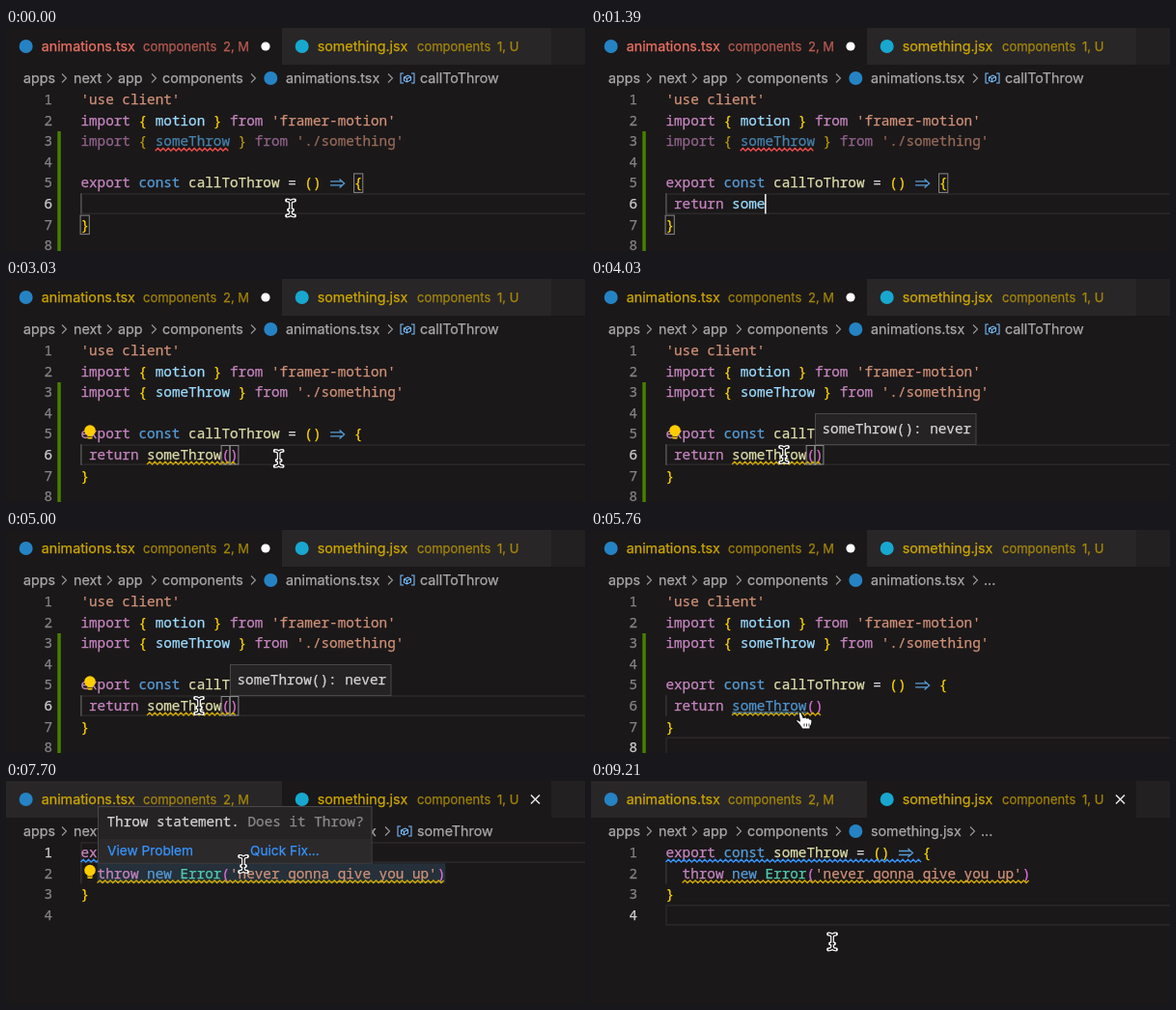
Animation of 600x231 px, one loop 9.24 s. Source, as an HTML page:

```html
<!DOCTYPE html>
<html lang="en">
<head>
<meta charset="utf-8">
<title>Editor demo</title>
<style>
  html, body { margin: 0; width: 100%; height: 100%; overflow: hidden; background: #1b1819; }
  svg { display: block; width: 600px; height: 231px; }
  text { white-space: pre; font: 14.3px Inter, sans-serif; stroke-width: .25px; }
  .small { font-size: 13px; }
  .action { font-size: 13.7px; }
  .code { font: 14.32px "Noto Sans Mono", "DejaVu Sans Mono", monospace; font-variant-ligatures: none; }
</style>
</head>
<body>
<svg id="stage" viewBox="0 0 600 231"></svg>
<script>
const LOOP = 9240, LEFT = 77.4, CELL = 8.59, ROW = 21.6;
const SAVED = 5350, OPENED = 6000, LAST_CLICK = 8500;
const stage = document.getElementById('stage');
const color = {
  keyword: '#c586c0', blue: '#569cd6', string: '#ce9178', gold: '#ffd700', name: '#9cdcfe',
  fn: '#dcdcaa', paren: '#da70d6', type: '#4ec9b0', plain: '#d4d4d4', link: '#4e94ce',
  constant: '#5ab4f0', error: '#f14c4c', warn: '#cca700', info: '#3794ff'
};

// Pointer stops: time, x, y
const path = [
  [0, 295, 186.5], [2900, 295, 186.5], [3480, 200, 182], [5000, 200, 182], [5300, 170, 222],
  [5400, 170, 222], [5700, 219, 196.5], [6100, 219, 196.5], [6800, 215, 97], [7100, 215, 97],
  [7550, 246, 86], [7850, 246, 86], [8400, 250, 166.5], [LOOP, 250, 166.5]
];

const between = (t, a, b) => t >= a && t < b;
const colX = col => LEFT + col * CELL;
const rowY = row => 74 + ROW * (row - 1);

// A hairline stroke gives the text its slightly heavier weight
const text = (x, y, str, fill, cls = '', extra = '') =>
  `<text x="${x}" y="${y}" fill="${fill}" stroke="${fill}" class="${cls}" ${extra}>${str}</text>`;
const rect = (x, y, w, h, fill, extra = '') =>
  `<rect x="${x}" y="${y}" width="${w}" height="${h}" fill="${fill}" ${extra}/>`;
const stroke = (d, ink, width = 1, extra = '') =>
  `<path d="${d}" fill="none" stroke="${ink}" stroke-width="${width}" ${extra}/>`;
const dot = (x, y, r, fill) => `<circle cx="${x}" cy="${y}" r="${r}" fill="${fill}"/>`;

function arrow(x, y) {
  return stroke(`M${x + 1} ${y - 2}h12.5M${x + 1} ${y + 2}h12.5M${x + 10.5} ${y - 4.5}l5 4.5l-5 4.5`, color.blue, 1.3);
}

// Tokens alternate colour name and text
function line(row, tokens, col = 0) {
  let out = '';
  for (let i = 0; i < tokens.length; i += 2) {
    const str = tokens[i + 1];
    out += str.startsWith('=>')
      ? arrow(colX(col), rowY(row) + .5)
      : text(colX(col), rowY(row) + 5, str, color[tokens[i]], 'code');
    col += str.length;
  }
  return out;
}

function squiggle(row, from, to, ink) {
  const end = colX(to);
  let x = colX(from), up = true, d = `M${x} ${rowY(row) + 10}`;
  for (; x + 2.7 <= end; up = !up) d += `L${x += 2.7} ${rowY(row) + (up ? 7.3 : 10)}`;
  return stroke(d, ink, 1.4);
}

const bracket = (row, col) =>
  rect(colX(col) - .3, rowY(row) - 9.5, CELL + .6, 19.5, 'none', 'stroke="#888"');
const guide = (row, ink) => rect(LEFT, rowY(row) - 10.8, 1, ROW, ink);
const caret = (row, col) => rect(colX(col) - .5, rowY(row) - 10, 1.6, 20.5, '#e8e8e8');
const chevron = x => stroke(`M${x - 2} 47.5l4.5 4.5l-4.5 4.5`, '#999', 1.1);

function gutter(count, current) {
  const y = rowY(current);
  let out = rect(LEFT + .6, y - 10, 530, ROW - 1.4, 'none', 'stroke="#2a2728" stroke-width="1.6"');
  for (let n = 1; n <= count; n++)
    out += text(48, rowY(n) + 5, n, n === current ? '#d0d0d0' : '#858585', 'code', 'text-anchor="end"');
  return out;
}

function tab(x, width, active, ink, file, badge) {
  const first = x === 0, descX = x + (first ? 142 : 140), badgeX = x + (first ? 225 : 223);
  return rect(x, 0, width, 38, active ? '#1b1819' : '#292627') +
    dot(x + 20.7, 19, 7, first ? '#2583c4' : '#18a8cf') + text(x + 36.7, 24, file, ink) +
    `<g opacity=".75">${text(descX, 24, 'components', ink, 'small')}${text(badgeX, 24, badge, ink, 'small')}</g>`;
}

function breadcrumb(file, chevX, symbol) {
  const grey = '#a9a9a9', iconX = chevX + 10;
  let out = [[18, 'apps'], [70, 'next'], [116, 'app'], [162, 'components'], [290, file]]
    .map(([x, str]) => text(x, 57, str, grey)).join('');
  out += [60, 107, 153, 256, chevX].map(chevron).join('') + dot(274.3, 52, 7, '#2583c4');
  if (!symbol) return out + text(chevX + 9, 57, '...', grey);
  const icon = `M${iconX + 4} 47h-3v10h3M${iconX + 12} 47h3v10h-3` +
    `M${iconX + 4.5} 51l4-2l3 1.5v3.5l-4 2l-3-1.5zl3 1.5l4-2m-4 2v3`;
  return out + stroke(icon, '#75beff', 1.1) + text(chevX + 31, 57, symbol, grey);
}

function bulb(y) {
  return dot(87, y - 1.5, 5.8, '#ffcc00') + rect(84.5, y + 2, 5, 5, '#ffcc00') +
    rect(84.5, y + 4.5, 5, 1, '#5a4a10');
}

function callerFile(t) {
  const typedAt = i => 500 + i * 80 + (i > 10 ? 150 : 0);
  const source = 'return someThrow(';
  let typed = 0;
  while (typed < source.length && t >= typedAt(typed)) typed++;
  const called = typed === source.length;
  const checked = t >= 2120, used = t >= 2400, clicked = t >= SAVED;
  const linked = between(t, 5650, OPENED);
  const word = source.slice(7, Math.min(typed, 16));
  const current = clicked ? 8 : 6;
  const badge = checked && !used ? '1, M' : '2, M';
  const width = badge === '1, M' ? 284 : 286; // the digit 1 is narrower

  let out = tab(0, width, true, checked ? color.warn : '#ea7163', 'animations.tsx', badge) +
    dot(width - 17, 19, 4.6, '#fff') +
    tab(width, 279, false, color.warn, 'something.jsx', '1, U') +
    breadcrumb('animations.tsx', 398, clicked ? '' : 'callToThrow') +
    gutter(8, current) + rect(53.3, 107, 3.5, 124, '#487e02') +
    line(1, ['string', "'use client'"]) +
    line(2, ['keyword', 'import ', 'gold', '{ ', 'name', 'motion ', 'gold', '} ', 'keyword', 'from ', 'string', "'framer-motion'"]);

  const imported = ['keyword', 'import ', 'gold', '{ ', checked ? 'name' : 'constant', 'someThrow ', 'gold', '} ',
    'keyword', 'from ', 'string', "'./something'"];
  out += `<g opacity="${used ? 1 : .68}">${line(3, imported)}</g>`;
  if (!checked) out += squiggle(3, 9, 18, color.error);

  out += line(5, ['keyword', 'export ', 'blue', 'const ', 'fn', 'callToThrow ', 'plain', '= ', 'gold', '() ', 'blue', '=> ', 'gold', '{']) +
    line(7, ['gold', '}']) + guide(6, clicked ? '#454243' : '#666') +
    line(6, ['keyword', source.slice(0, Math.min(typed, 6))], 1) +
    line(6, [linked ? 'link' : called ? 'fn' : 'name', word], 8);
  if (called) out += line(6, ['paren', '()'], 17);
  if (checked) out += squiggle(6, 8, 19, color.warn);
  if (linked) out += rect(colX(8), rowY(6) + 6.5, 9 * CELL, 1, color.link);

  if (t < 2260) out += bracket(5, 33) + bracket(7, 0);
  else if (!clicked) out += bracket(6, 17) + bracket(6, 18);
  if (between(t, 500, 2300) || between(t % 1000, 230, 730))
    out += clicked ? caret(8, 0) : caret(6, 1 + typed);
  if (between(t, 2650, SAVED)) out += bulb(158.5);
  if (between(t, 3700, 5060))
    out += rect(232.5, 139.5, 166.5, 32, '#252324', 'stroke="#4a4748"') +
      text(239.5, 160, 'someThrow(): never', color.plain, 'code');
  return out;
}

function problemCard() {
  return rect(95.5, 26.5, 283.5, 58.5, '#252324', 'stroke="#4a4748"') +
    rect(96, 60, 282.5, 24.5, '#2b292a') +
    text(104.5, 47, 'Throw statement.', color.plain, 'code') +
    text(104.5 + 17 * CELL, 47, 'Does it Throw?', '#8b8889', 'code') +
    text(105, 77, 'View Problem', color.info, 'action') + text(253, 77, 'Quick Fix...', color.info, 'action');
}

function throwerFile(t) {
  const card = between(t, 7050, 8100), clicked = t >= LAST_CLICK;
  let out = tab(0, 286, false, color.warn, 'animations.tsx', '2, M') +
    tab(286, 279, true, color.warn, 'something.jsx', '1, U') +
    stroke('M544 14.5l9 9m0-9l-9 9', '#e8e8e8', 1.5) +
    breadcrumb('something.jsx', 395, clicked ? '' : 'someThrow') +
    gutter(4, clicked ? 4 : 1) + guide(2, '#454243');
  if (card) out += rect(colX(2), rowY(2) - 10.3, 42 * CELL, 20.6, '#25303a');
  out += line(1, ['keyword', 'export ', 'blue', 'const ', 'fn', 'someThrow ', 'plain', '= ', 'gold', '() ', 'blue', '=> ', 'gold', '{']) +
    line(2, ['keyword', 'throw ', 'blue', 'new ', 'type', 'Error', 'paren', '(', 'string', "'never gonna give you up'", 'paren', ')'], 2) +
    line(3, ['gold', '}']) +
    squiggle(1, 0, 31, color.info) + squiggle(2, 2, 44, color.warn);
  if (between(t % 1000, 230, 730)) out += clicked ? caret(4, 0) : caret(1, 13);
  if (card) out += problemCard();
  if (between(t, 6700, LAST_CLICK)) out += bulb(94);
  return out;
}

function pointer(t) {
  if (between(t, 500, 2900)) return '';
  const i = path.findIndex(stop => stop[0] > t);
  const [t0, x0, y0] = path[i - 1], [t1, x1, y1] = path[i];
  const p = (t - t0) / (t1 - t0), k = p * p * (3 - 2 * p);
  const place = `transform="translate(${x0 + (x1 - x0) * k} ${y0 + (y1 - y0) * k})"`;
  if (between(t, 5650, 6100))
    return `<path ${place} d="M-4 -7q1.5-1.5 3 0l2 5q3-1.5 3.5.5q2.5-1 3 1q2.5-.5 2.5 2q0 4-2 6v2h-8q-3-5-6.5-8q0-2.5 4 0z"
      fill="#fff" stroke="#111" stroke-width="1.1" stroke-linejoin="round"/>` +
      stroke('M2 4v3M4.5 4v3M7 4v3', '#111', .8, place);
  const beam = 'M-4 -8q4 0 4 3v10q0 3-4 3M4 -8q-4 0-4 3v10q0 3 4 3M-2 2h4';
  return stroke(beam, '#fff', 3.8, place + ' stroke-linecap="round"') + stroke(beam, '#111', 1.4, place);
}

let shown = '';
function draw(now) {
  const t = now % LOOP;
  const view = rect(0, 0, 600, 231, '#1b1819') + rect(565, 0, 35, 38, '#222021') +
    (t < OPENED ? callerFile(t) : throwerFile(t)) + pointer(t);
  if (view !== shown) stage.innerHTML = shown = view;
  requestAnimationFrame(() => draw(performance.now() - start));
}
const start = performance.now();
draw(0);
</script>
</body>
</html>
```
